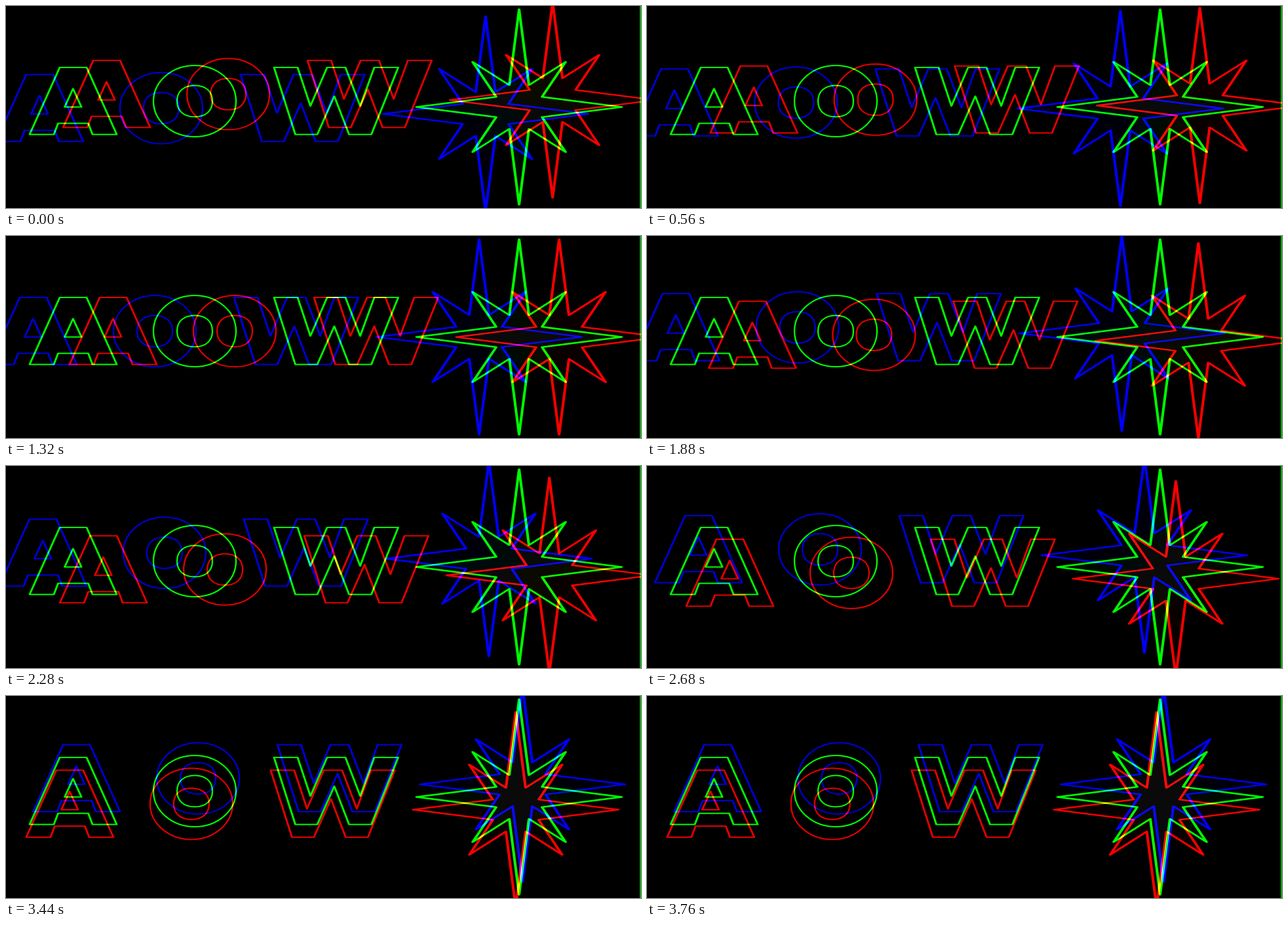
Recreate the animation shown at these times as an HTML page with a canvas. Size 969 px wide and 309 px high, loop 3800 ms.

```html
<!DOCTYPE html>
<html lang="en">
<head>
<meta charset="utf-8">
<title>AOW</title>
<style>
html, body { margin: 0; width: 100%; height: 100%; overflow: hidden; background: #000; }
canvas { display: block; width: 969px; height: 309px; }
</style>
</head>
<body>
<canvas id="stage" width="969" height="309" role="img" aria-label="A O W and an eight-pointed star"></canvas>
<script>
const ctx = document.getElementById('stage').getContext('2d');
const LOOP = 3800, STEP = 40, SWEEP = 2240;
const ORBIT = { x: 61, y: 19.5 };

function polygon(cx, cy, points) {
  const path = new Path2D();
  points.forEach(([x, y]) => path.lineTo(cx + x, cy + y));
  path.closePath();
  return path;
}

// Closes a right half with its mirror image
const mirrored = half => half.concat(half.map(([x, y]) => [-x, y]).reverse());

// k sets how square the ring looks
function ring(cx, cy, rx, ry, k) {
  const path = new Path2D();
  path.moveTo(cx + rx, cy);
  for (let i = 0; i < 4; i++) {
    const a = i * Math.PI / 2, c = Math.cos(a), s = Math.sin(a);
    path.bezierCurveTo(
      cx + rx * (c - k * s), cy + ry * (s + k * c),
      cx + rx * (k * c - s), cy + ry * (k * s + c),
      cx - rx * s, cy + ry * c);
  }
  path.closePath();
  return path;
}

function starPath(cx, cy) {
  const upper = [[0, -149.5], [15, -33.5], [71, -69], [35, -15.5], [156.5, 0]];
  const lower = upper.slice(0, -1).map(([x, y]) => [x, -y]).reverse();
  return polygon(cx, cy, mirrored(upper.concat(lower)));
}

const straight = [
  polygon(102.5, 94, mirrored([[20.5, 0], [66.5, 102.5], [29.5, 102.5], [23, 85.5]])),
  polygon(102.3, 126.5, mirrored([[0, 0], [12.8, 28]])),
  polygon(409, 94, [[0, 0], [36, 0], [55.5, 59], [81, 0], [109, 0], [131.5, 59], [153, 0], [189.5, 0],
    [148.5, 102.5], [114.5, 102.5], [92, 44], [66, 102.5], [32.5, 102.5]])
];
const round = [ring(288, 145.5, 63, 54.5, 0.552), ring(288, 145.5, 27, 24, 0.62)];
const star = starPath(783, 154.5);

// Strokes with an oval pen, wider than it is tall
function outline(path, penX, penY) {
  const scaled = new Path2D();
  scaled.addPath(path, new DOMMatrix([1 / penX, 0, 0, 1 / penY, 0, 0]));
  ctx.save();
  ctx.scale(penX, penY);
  ctx.lineWidth = 1;
  ctx.stroke(scaled);
  ctx.restore();
}

function ease(u) {
  return (1 - Math.cos(Math.PI * Math.min(1, Math.max(0, u)))) / 2;
}

// One sweep comes to rest at 0 degrees, the next starts after a pause
function angleAt(t) {
  const deg = 85 * (ease((t + 1280) / SWEEP) - 1) + 95 * ease((t - 1260) / SWEEP);
  return deg * Math.PI / 180;
}

function layer(dx, dy, starColor, letterColor) {
  ctx.save();
  ctx.translate(dx, dy);
  ctx.strokeStyle = letterColor;
  straight.forEach(path => outline(path, 3, 2));
  round.forEach(path => outline(path, 2.3, 2));
  ctx.fillStyle = starColor;
  ctx.globalAlpha = 0.04;
  ctx.fill(star);
  ctx.globalAlpha = 1;
  ctx.strokeStyle = starColor;
  outline(star, 4, 2.4);
  ctx.restore();
}

function draw(t) {
  const angle = angleAt(t);
  const dx = ORBIT.x * Math.cos(angle), dy = ORBIT.y * Math.sin(angle);
  ctx.globalCompositeOperation = 'source-over';
  ctx.fillStyle = '#000';
  ctx.fillRect(0, 0, 969, 309);
  ctx.globalCompositeOperation = 'lighter';
  ctx.lineJoin = 'round';
  layer(-dx, -dy, '#00f', '#0000d8');
  layer(dx, dy, '#f00', '#e40000');
  layer(0, 0, '#0f0', '#0f0');
  ctx.fillStyle = '#00a800';
  ctx.fillRect(967, 0, 2, 309);
}

const start = performance.now();
function tick() {
  const t = (performance.now() - start) % LOOP;
  draw(Math.floor(t / STEP) * STEP);
  requestAnimationFrame(tick);
}
tick();
</script>
</body>
</html>
```
